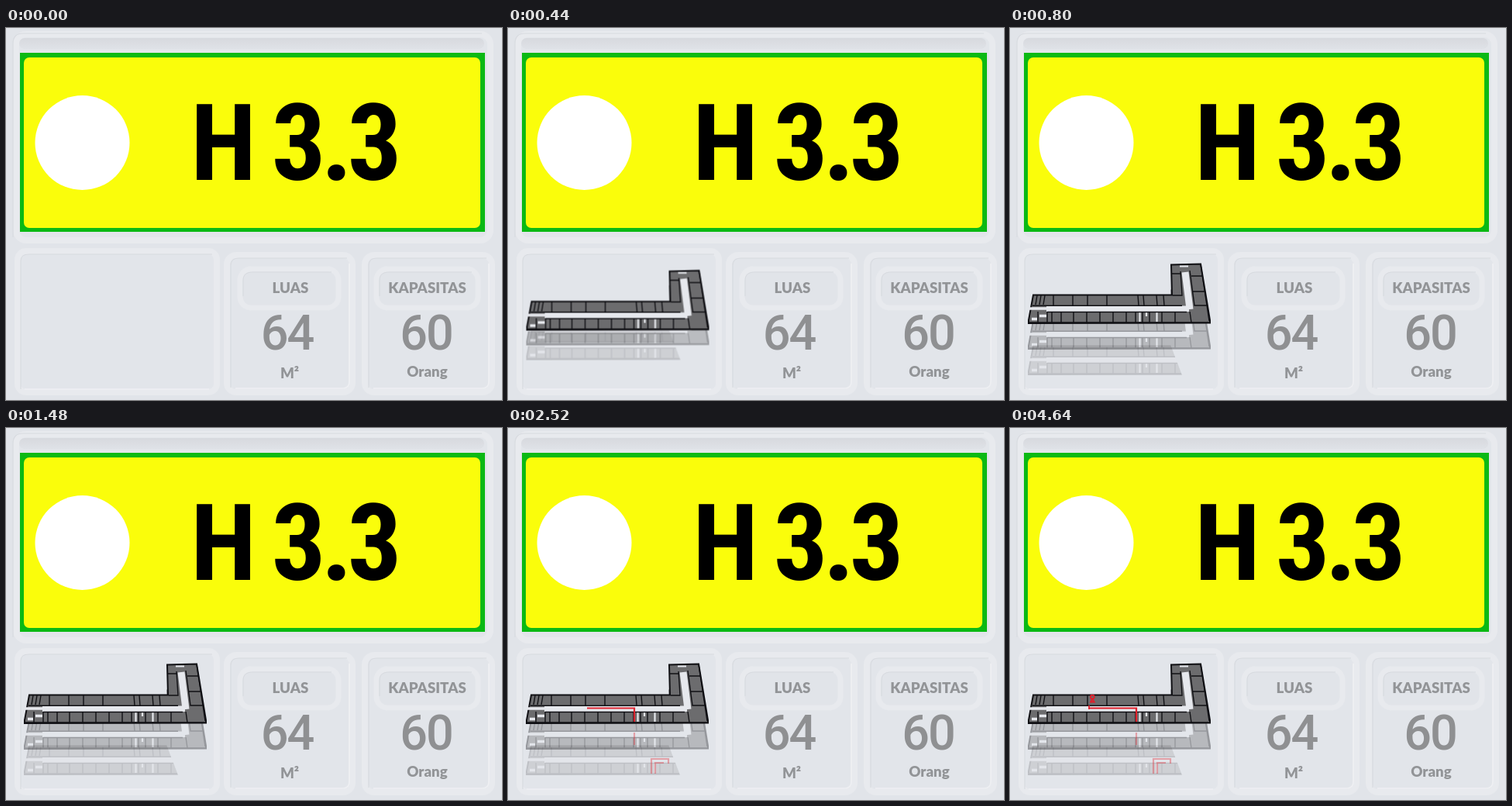
These frames come from a looping animation (640 by 480 pixels, 5.12 s). An HTML page:

```html
<!DOCTYPE html>
<html lang="id">
<head>
<meta charset="utf-8">
<title>Ruang H 3.3</title>
<style>
  html, body { margin: 0; width: 100%; height: 100%; overflow: hidden; background: #e1e4e9; }
  svg { position: absolute; left: 0; top: 0; width: 640px; height: 480px; display: block; }
  .rim { fill: #e2e5ea; stroke: #e8eaee; stroke-width: 8; }
  .edge { fill: none; stroke: #d8dbe0; stroke-width: 1.2; }
  .glow { fill: none; stroke: #eff0f3; stroke-width: 1.6; }
  .pill { fill: #e1e4e9; stroke: #e8eaee; stroke-width: 7; }
  .sign { font: 700 138px "Roboto Condensed", Roboto, sans-serif; font-stretch: 75%; letter-spacing: -6px; text-anchor: middle; }
  .label { font: 900 18.7px Lato, sans-serif; fill: #929497; text-anchor: middle; }
  .value { font: 500 63px Roboto, sans-serif; letter-spacing: -2px; fill: #8f9092; text-anchor: middle; }
  .wall { fill: none; stroke: #101014; stroke-width: 1.4; }
  .hall { fill: none; stroke: #e6e8ed; stroke-linejoin: round; }
  .route { fill: none; stroke: #e01f2b; stroke-width: 2.2; }

  .floor, .ghost, .route, #pin { animation: 5120ms linear infinite both; }
  #top { animation-name: rise1; }
  #mid { animation-name: rise2; }
  #low { animation-name: rise3; }
  .route { animation-name: route; }
  .ghost { animation-name: trace; }
  #pin { animation-name: pin; }

  @keyframes rise1 {
    0%, .7% { transform: translate(2px, 17px); opacity: 0; }
    3.125% { transform: translate(1.5px, 15px); opacity: 1; }
    8.594% { transform: translate(.5px, 8.5px); }
    15.625%, 100% { transform: none; opacity: 1; }
  }
  @keyframes rise2 {
    0%, .7% { transform: translate(2px, 17px); opacity: 0; }
    3.125% { transform: translate(1.5px, 28px); opacity: .27; }
    8.594% { transform: translate(.5px, 27.5px); opacity: .34; }
    15.625%, 100% { transform: translateY(33px); opacity: .36; }
  }
  @keyframes rise3 {
    0%, .7% { transform: translate(2px, 17px); opacity: 0; }
    3.125% { transform: translate(1.5px, 35px); opacity: .08; }
    8.594% { transform: translate(.5px, 46.5px); opacity: .17; }
    15.625%, 100% { transform: translateY(66px); opacity: .17; }
  }
  @keyframes route { 0%, 33.6% { opacity: 0; } 50%, 100% { opacity: 1; } }
  @keyframes trace { 0%, 28.9% { opacity: 0; } 39.8%, 100% { opacity: .35; } }
  @keyframes pin { 0%, 58.5% { opacity: 0; } 61.7%, 100% { opacity: 1; } }
</style>
</head>
<body>
<svg viewBox="0 0 640 480">
  <defs>
    <linearGradient id="shade" x2="0" y2="1">
      <stop offset="0" stop-color="#d7d9de"/>
      <stop offset="1" stop-color="#dfe2e7"/>
    </linearGradient>
    <clipPath id="short"><path d="M20 340H206L222 382H20Z"/></clipPath>
    <g id="plan">
      <path d="M30 344.5H209L208 305.5L246 304.5L258 377V380.5L24 381V377Z" fill="#6c6c6e" stroke="#101014" stroke-width="2"/>
      <path class="hall" d="M47 362.3H231" stroke-width="7.5"/>
      <path class="hall" d="M232 363L226 315" stroke-width="9"/>
      <path class="hall" d="M25 362H47M38 371.5H47M28 375.5H35" stroke-width="3.5"/>
      <path class="hall" d="M167.5 367V379M176 367V372M189.5 367V379M219 307.5H230" stroke-width="2.2"/>
      <path class="wall" d="M29 358.3H222M48 366.5H228M24.5 380H258" stroke-width="2"/>
      <path class="wall" d="M35 345L33 357M40 345L38 357M45 345L43 357M56 345V358M81 345V358M100 345V358M125 345V358M165 345L166 358M172 345L173 358M189 345L190 358M198 345L199 358"/>
      <path class="wall" d="M36 366V380M48 366V380M54 366V380M66 366V380M82 366V380M99 366V380M116 366V380M133 366V380M150 366V380M162 366V380M171 366V380M180 366V380M196 366V380M213 366V380M232 366L234 380"/>
      <path class="wall" d="M209 317H221M210 345L222 345L220 314M232 313L238 358H254M234 320H248M236 340H251M246 305L257 378"/>
    </g>
  </defs>

  <rect width="640" height="480" fill="#e1e4e9"/>
  <rect class="rim" x="13" y="8" width="612" height="266" rx="13"/>
  <rect x="17" y="13" width="600" height="14" rx="7" fill="url(#shade)"/>
  <path class="edge" d="M9 270V20Q9 7 22 7H614"/>

  <path d="M18 32H618V263H18Z" fill="#0bb914"/>
  <rect x="23" y="38" width="589" height="220" rx="7" fill="#fafd0b"/>
  <circle cx="98.5" cy="148" r="61" fill="#fff"/>
  <text class="sign" x="371.5" y="196">H 3.3</text>

  <rect class="rim" x="15" y="288" width="257" height="182" rx="11"/>
  <rect class="rim" x="285" y="293" width="162" height="177" rx="12"/>
  <rect class="rim" x="463" y="293" width="164" height="177" rx="12"/>
  <path class="edge" d="M19 466V301Q19 292 29 292H266M290 464V307Q290 297 300 297H440M468 464V307Q468 297 478 297H620"/>
  <path class="glow" d="M24 466H262M296 465H434Q443 465 443 456V304M474 465H614Q623 465 623 456V304"/>

  <rect class="pill" x="302" y="311" width="127" height="50" rx="14"/>
  <rect class="pill" x="478" y="311" width="131" height="50" rx="14"/>
  <path class="edge" d="M306 346V326Q306 315 318 315H420M482 346V326Q482 315 494 315H601"/>

  <text class="label" x="367" y="341.5">LUAS</text>
  <text class="label" x="543.5" y="341.5">KAPASITAS</text>
  <text class="value" x="362.5" y="415">64</text>
  <text class="value" x="542" y="415">60</text>
  <text class="label" x="366" y="452">M²</text>
  <text class="label" x="543.5" y="450">Orang</text>

  <g class="floor" id="low"><use href="#plan" clip-path="url(#short)"/></g>
  <g class="floor" id="mid"><use href="#plan"/></g>
  <path class="route ghost" d="M185 446V427H207V433M190 446V432H201M163 393V409"/>
  <g class="floor" id="top"><use href="#plan"/></g>
  <path class="route" d="M102 361.5H163V379"/>
  <g id="pin" fill="none" stroke="#e01f2b" stroke-width="1.8">
    <circle cx="106.3" cy="347" r="2.4"/>
    <path d="M106.3 349.5L104 353.5H108.8Z"/>
    <path d="M102 358V363"/>
  </g>
</svg>
</body>
</html>
```
